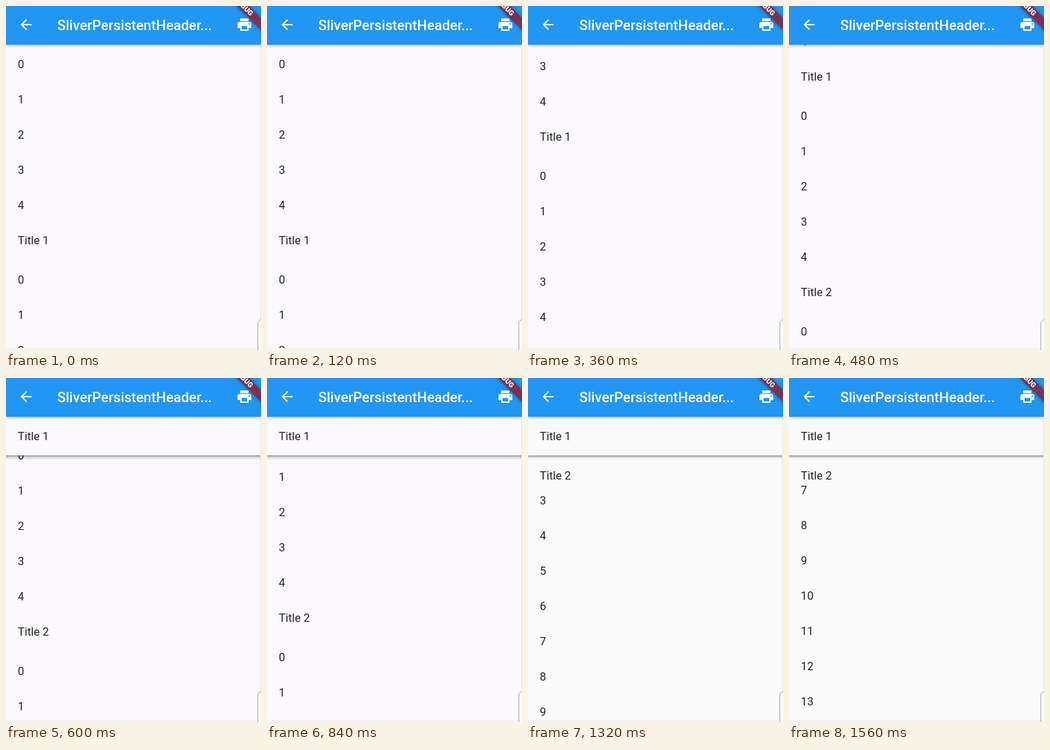
An HTML page for the animation above (1680 ms loop, 368 by 498 pixels).

```html
<!DOCTYPE html>
<html lang="en">
<head>
<meta charset="utf-8">
<style>
  html, body { margin: 0; width: 100%; height: 100%; overflow: hidden; }
  #stage {
    --bg: #fbf9fc;
    position: relative; width: 368px; height: 498px; overflow: hidden;
    background: var(--bg); color: #242325;
    font: 16.3px/20px Roboto, sans-serif;
  }
  #stage.settled { --bg: #fafafa; }
  #stage div, #stage svg { position: absolute; }
  #view { inset: 0 0 3px; overflow: hidden; }
  #list { inset: 0; }
  .row, .title { left: 0; width: 351px; padding: 20px 0 0 17px; }
  .title { top: 0; height: 37px; background: var(--bg); }
  .title.cover { height: 19px; }
  .title.raised { box-shadow: 0 1px 3px 1px rgba(0, 0, 0, .42); }
  .title.raised.moving { box-shadow: 0 1px 2px rgba(0, 0, 0, .45), 0 5px 2px rgba(0, 0, 0, .13); }
  #bar {
    left: 0; top: 0; width: 368px; height: 56px; background: #2196f3;
    box-shadow: 0 1px 4px rgba(0, 0, 0, .36);
  }
  #bar svg { top: 15px; width: 24px; height: 24px; fill: #fff; }
  #name { left: 74px; top: 16px; color: #fff; font-size: 20.2px; line-height: 24px; font-weight: 500; white-space: nowrap; }
  #banner {
    left: 293px; top: -5px; width: 100px; height: 12px; transform: rotate(45deg);
    background: rgba(145, 24, 42, .78); box-shadow: 0 0 5px rgba(0, 0, 0, .45);
    color: #fff; font-size: 10.2px; line-height: 12px; font-weight: 900; text-align: center;
  }
  #edge { right: 0; top: 58px; bottom: 0; width: 1px; background: #e7e6e8; }
  #foot { left: 0; bottom: 0; width: 368px; height: 3px; background: #f4f3f5; }
  #handle {
    left: 363px; top: 454px; width: 12px; height: 60px; box-sizing: border-box;
    border: 1.5px solid #a9a9ab; border-radius: 5px; background: #fafafa;
  }
</style>
</head>
<body>
<div id="stage">
  <div id="view">
    <div id="list"></div>
    <div class="title" id="second">Title 2</div>
    <div class="title" id="first">Title 1</div>
  </div>
  <div id="edge"></div>
  <div id="foot"></div>
  <div id="handle"></div>
  <div id="bar">
    <svg style="left:17px" viewBox="0 0 24 24"><path d="M20 11H7.83l5.59-5.59L12 4l-8 8 8 8 1.41-1.41L7.83 13H20z"/></svg>
    <div id="name">SliverPersistentHeader...</div>
    <svg style="left:332px" viewBox="0 0 24 24"><path d="M19 8H5c-1.66 0-3 1.34-3 3v6h4v4h12v-4h4v-6c0-1.66-1.34-3-3-3zm-3 11H8v-5h8v5zm3-7c-.55 0-1-.45-1-1s.45-1 1-1 1 .45 1 1-.45 1-1 1zm-1-9H6v4h12V3z"/></svg>
  </div>
  <div id="banner">DEBUG</div>
</div>
<script>
  const $ = id => document.getElementById(id);
  const STEP = 120, ROW = 51, HEAD = 57, TOP = 55;
  // Scroll offset per step: two flings, each easing out.
  const SCROLL = [0, 0, 0, 150, 237, 284, 300, 304, 306, 306, 508, 684, 806, 903];
  const FIRST = TOP + 5 * ROW, SECOND = FIRST + HEAD + 5 * ROW;

  function addRows(top, count) {
    for (let i = 0; i < count; i++) {
      const row = document.createElement('div');
      row.className = 'row';
      row.style.top = top + i * ROW + 'px';
      row.textContent = i;
      $('list').append(row);
    }
  }
  addRows(TOP, 5);
  addRows(FIRST + HEAD, 5);
  addRows(SECOND + HEAD, 18);

  const move = (el, y) => { el.style.transform = `translateY(${y}px)`; };

  function draw(now) {
    const step = Math.floor(now / STEP) % SCROLL.length;
    const y = SCROLL[step];
    move($('list'), -y);
    move($('first'), Math.max(TOP, FIRST - y));
    move($('second'), Math.max(TOP + HEAD, SECOND - y));
    $('first').classList.toggle('raised', FIRST - y < TOP);
    $('first').classList.toggle('moving', step < 8);
    $('second').classList.toggle('cover', SECOND - y < TOP + HEAD);
    $('stage').classList.toggle('settled', step >= 8);
  }

  const start = performance.now();
  function tick() {
    draw(performance.now() - start);
    requestAnimationFrame(tick);
  }
  tick();
</script>
</body>
</html>
```
